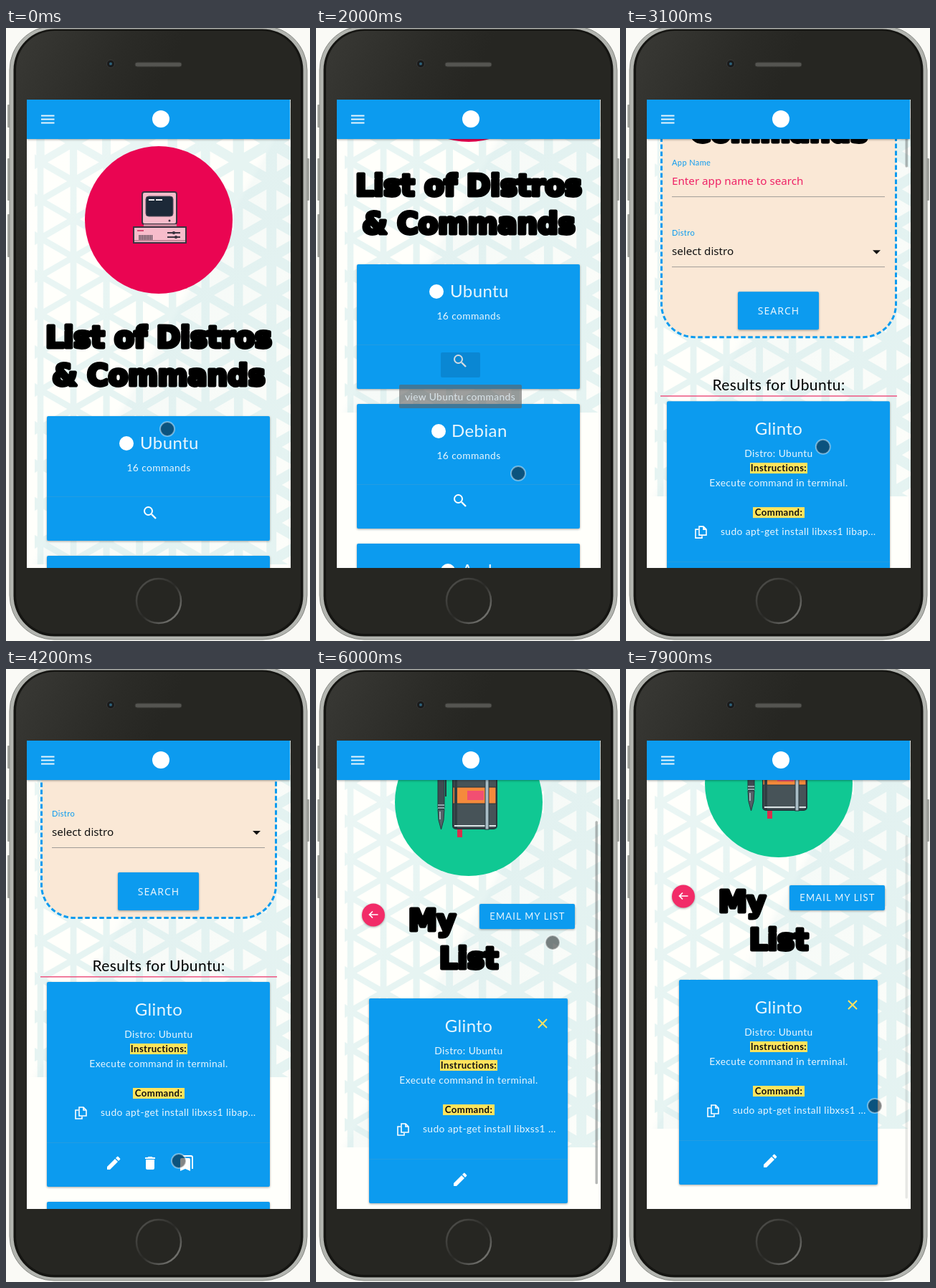
These frames come from a looping animation (424x856 px, 8 s). An HTML page:

```html
<!DOCTYPE html>
<html lang="en">
<head>
<meta charset="utf-8">
<title>Distros and commands</title>
<style>
html, body { margin: 0; width: 100%; height: 100%; overflow: hidden; background: #fafaf6; }
#stage { display: block; width: 424px; height: 856px; }
text { font-family: Lato, "Open Sans", sans-serif; font-size: 13.8px; letter-spacing: .4px; fill: #e9f6fd; white-space: pre; }
.mid { text-anchor: middle; }
.title { font-size: 24px; }
.head { font: bold 40px "DejaVu Sans", sans-serif; letter-spacing: 0; fill: #000; stroke: #000; stroke-width: 5; stroke-linejoin: round; }
.label { font-size: 11px; fill: #0c9bef; }
.field { font: 15.2px "Noto Sans", sans-serif; letter-spacing: 0; fill: #111; }
.hint { fill: #ee2266; }
.search { font: 14px "Noto Sans", sans-serif; letter-spacing: 1px; }
.caps { font-size: 13px; letter-spacing: 1.2px; }
.bold { font-size: 13.2px; font-weight: 700; fill: #111; }
.results { font-size: 21px; fill: #000; }
.lift { filter: drop-shadow(0 1px 1.5px rgba(0,0,0,.35)); }
.high { filter: drop-shadow(0 4px 4px rgba(0,0,0,.42)); }
</style>
</head>
<body>
<svg id="stage" viewBox="0 0 424 856" xmlns="http://www.w3.org/2000/svg"></svg>
<script>
const BLUE = '#0c9bef', MINT = '#e6f4f2', PAPER = '#fffffb';
const stage = document.getElementById('stage');

const rect = (x, y, w, h, fill, more = '') =>
  `<rect x="${x}" y="${y}" width="${w}" height="${h}" fill="${fill}" ${more}/>`;
const disc = (x, y, r, fill, more = '') =>
  `<circle cx="${x}" cy="${y}" r="${r}" fill="${fill}" ${more}/>`;
const line = (d, stroke, width) =>
  `<path d="${d}" fill="none" stroke="${stroke}" stroke-width="${width}"/>`;
const text = (x, y, str, cls = '') => `<text x="${x}" y="${y}" class="${cls}">${str}</text>`;
const mid = (x, y, str, cls = '') => text(x, y, str, 'mid ' + cls);
const group = (id, body) => `<g id="${id}">${body}</g>`;
const panel = (x, y, w, h, id = '') => rect(x, y, w, h, BLUE, `rx="2" class="lift" id="${id}"`);
const divider = (x, y, w) => rect(x, y, w, 1, 'rgba(150,160,160,.17)');

// Icons drawn around their own centre
const ICONS = {
  search: line('M2 2L8 8', '#fff', 2.4) + '<circle cx="-2.5" cy="-2.5" r="5.500" fill="none" stroke="#fff" stroke-width="2"/>',
  edit: '<path fill="#fff" d="M-9 5v4h4L6-2 2-6zM3-7l4 4 2-2q.8-.8 0-1.600L6.600-9q-.8-.8-1.600 0z"/>',
  trash: '<path fill="#fff" d="M-6-5H6V7q0 2-2 2h-8q-2 0-2-2zM-7-8h3.500l1-1h5l1 1H7v2H-7z"/>',
  saved: '<path fill="#fff" d="M-9 11V-5q0-2 2-2H3q2 0 2 2v16l-7-3z"/>' + line('M-5-10H6q2 0 2 2V8', '#fff', 2),
  copy: line('M-2-8h6l4 4v8h-10zM4-8v4h4M-3-4h-4v12h9v-3', '#fff', 1.6),
  close: line('M-6-6L6 6M6-6L-6 6', '#ffe261', 2)
};
const icon = (name, x, y) => `<g transform="translate(${x} ${y})">${ICONS[name]}</g>`;

// Triangle lattice with openings that shrink towards the top and the right
function backdrop(y) {
  const colW = 46, rowH = 53;
  let d = '';
  const tri = (x, cy, dir) => {
    const s = .72 - .2 * (x / 368) ** 2 - .2 * Math.max(0, 1 - cy / 120);
    const w = dir * colW * s, h = rowH / 2 * s;
    d += `M${x - w / 3} ${cy - h}v${2 * h}l${w} ${-h}z`;
  };
  for (let k = -1; k < 8; k++) {
    for (let j = -1; j < 14; j++) {
      const x = 19 + colW * k, cy = 13 + rowH * (j + (k & 1) / 2);
      tri(x + colW / 3, cy, 1);
      tri(x + colW * 2 / 3, cy + rowH / 2, -1);
    }
  }
  return `<svg x="29" y="${y}" width="368" height="654" overflow="hidden">` +
    rect(11, 0, 357, 654, MINT) + `<path d="${d}" fill="${PAPER}"/>` +
    rect(0, 0, 368, 654, 'url(#wash)') + '</svg>';
}

const sheet = bgTop => rect(29, -200, 368, 2000, PAPER) + backdrop(bgTop);

function distroCard(y, name, textX, logoX) {
  return panel(57, y, 311, 174) + divider(57, y + 112, 311) +
    disc(logoX, y + 38, 10, '#fff') + text(textX, y + 46, name, 'title') +
    mid(213, y + 77, '16 commands') + icon('search', 201, y + 135);
}

function commandCard(x, y, w, command, id) {
  const marked = (ty, str, half) =>
    rect(213 - half, ty - 12, half * 2, 15, '#ffe45c') + mid(213, ty, str, 'bold');
  return panel(x, y, w, 286, id) +
    mid(213, y + 47, 'Glinto', 'title') + mid(213, y + 78, 'Distro: Ubuntu') +
    marked(y + 98, 'Instructions:', 40) +
    mid(213, y + 118.5, 'Execute command in terminal.') +
    marked(y + 160, 'Command:', 36) +
    icon('copy', x + 47, y + 183) + text(x + 75, y + 187, command) +
    divider(x, y + 224, w);
}

function computer() {
  const ink = '#3b3340', pink = '#f7bccb', shade = '#c9899c';
  let slots = '';
  for (let i = 0; i < 9; i++) slots += `M${186 + 2.2 * i} 289v7`;
  return rect(190, 229, 48, 45, pink, `rx="3" stroke="${ink}" stroke-width="2"`) +
    rect(195, 235, 38, 28, '#1c2938', 'rx="4" stroke="#56505f"') +
    line('M199 240h8M209 240h9', '#f2f2f2', 2) + disc(228, 269, 1.5, ink) +
    rect(192, 274, 46, 4, shade) +
    rect(178, 278, 73, 22, pink, `stroke="${ink}" stroke-width="2"`) +
    line('M179 297h71', shade, 2) + line(slots, ink, 1.1) +
    line('M183 283h9', '#d64c74', 2) + line('M225 286h18M225 292h18', ink, 2) +
    line('M234 284v4M237 290v4', ink, 3);
}

function notebook() {
  const ink = '#26363c', edge = `stroke="${ink}"`;
  return rect(197, 221, 7, 14, '#d92f4c') +
    rect(191, 138, 61, 85, '#475358', `rx="4" stroke-width="2" ${edge}`) +
    rect(191, 165, 60, 23, '#f58a3c', edge) + rect(211, 170, 23, 13, '#f24f72') +
    line('M195 139v83', '#313e43', 4) + line('M193 219h58', '#dce5e6', 2) +
    rect(236, 138, 5, 86, '#a9bdc6', edge) +
    rect(170, 146, 9, 50, '#3f4b52', `rx="2" ${edge}`) +
    line('M179 150h2v28', ink, 2) + line('M170 190h9M170 194h9', '#8fa3ab', 2) +
    `<path d="M170 196h9l-1 15-3.500 13-3.500-13z" fill="#536168" ${edge}/>` +
    line('M173 199v11', '#b7c8ce', 1.5);
}

const tip = rect(174, 665, 55, 35, 'rgba(0,40,70,.17)', 'rx="2"') +
  rect(116, 710, 171, 33, 'rgba(97,97,97,.6)', 'rx="2"') +
  `<g opacity=".8">${mid(201, 732, 'view Ubuntu commands')}</g>`;

const home = sheet(95) + disc(213, 268, 103, '#ea0552') + computer() +
  mid(213, 446, 'List of Distros', 'head') + mid(213, 499, '&amp; Commands', 'head') +
  distroCard(542, 'Ubuntu', 187, 168) + distroCard(737, 'Debian', 189, 171) +
  distroCard(932, 'Arch', 203, 184) + group('tip', tip);

const find = sheet(155) +
  rect(49.5, 197.5, 327, 389, '#fae8d6', `rx="46" stroke="${BLUE}" stroke-width="3" stroke-dasharray="6.5 3.5"`) +
  mid(213, 261, 'Find', 'head') + mid(213, 314, 'Commands', 'head') +
  text(64, 347, 'App Name', 'label') + text(64, 374, 'Enter app name to search', 'field hint') +
  text(64, 445, 'Distro', 'label') + text(64, 472, 'select distro', 'field') +
  line('M64 390.5h297M64 488.5h297', '#a09c97', 1) +
  '<path d="M344 465h11l-5.5 5.5z" fill="#111"/>' +
  panel(156, 523, 113, 53) + mid(213, 555, 'SEARCH', 'search') +
  mid(213, 661, 'Results for Ubuntu:', 'results') + rect(48, 668, 330, 1.6, '#ee5f88') +
  commandCard(57, 676, 311, 'sudo apt-get install libxss1 libap…', 'pick') +
  ['edit', 'trash', 'saved'].map((name, i) => icon(name, 150 + 51 * i, 929)).join('') +
  panel(57, 983, 311, 286);

const list = sheet(14) + disc(213, 186, 103, '#10c893') + notebook() +
  disc(80, 343.5, 16, '#f22c68', 'class="lift"') +
  line('M86.5 343h-12M79 338.5l-4.500 4.500 4.500 4.500', '#fff', 1.7) +
  mid(162, 365, 'My', 'head') + mid(213, 418, 'List', 'head') +
  panel(228, 328, 133, 35) + mid(295, 350, 'EMAIL MY LIST', 'caps') +
  commandCard(74, 460, 277, 'sudo apt-get install libxss1 …', '') +
  icon('edit', 201, 713) + icon('close', 316, 495);

const button = (x, y, h) => rect(x, y, 4, h, '#a3a5a0', 'rx="1"');
const phone = button(2, 107, 32) + button(2, 182, 59) + button(2, 260, 60) + button(419, 182, 59) +
  rect(5, -3, 415, 857, '#b2b4af', 'rx="62" stroke="#858782"') +
  rect(10.5, 1.5, 404, 848, '#151512', 'rx="57"') +
  rect(14, 4, 397, 842, 'url(#body)', 'rx="54"') +
  disc(146, 50, 5.5, '#191a1b', 'stroke="#3a3a37"') + disc(146, 50, 2, '#2d6079') +
  rect(180, 48, 65, 6, '#555551', 'rx="3" stroke="#3a3a37"') +
  disc(213, 800, 31, 'none', 'stroke="url(#ring)" stroke-width="2.5"');

const nav = rect(29, 100, 367, 55, BLUE, 'class="lift"') +
  line('M49 122.5h18.5M49 127.5h18.5M49 132.5h18.5', '#e6f5fd', 1.8) + disc(216, 127, 12, '#fff');

const stop = (at, color, alpha = 1) =>
  `<stop offset="${at}" stop-color="${color}" stop-opacity="${alpha}"/>`;
const gradient = (id, ...stops) =>
  `<linearGradient id="${id}" x1="0" y1="0" x2="1" y2="1">${stops.join('')}</linearGradient>`;

stage.innerHTML = '<defs><clipPath id="screen">' + rect(29, 100, 368, 654, '#000') + '</clipPath>' +
  gradient('wash', stop(0, '#fff', .25), stop(.5, '#fff', 0), stop(.52, '#d3e7ea', .2), stop(1, '#d3e7ea', .05)) +
  gradient('body', stop(0, '#393935'), stop(.2, '#2b2b27'), stop(.3, '#262622'), stop(1, '#262622')) +
  gradient('ring', stop(0, '#555551'), stop(.5, '#2b2b28'), stop(1, '#8b8b87')) + '</defs>' + phone +
  '<g clip-path="url(#screen)">' + group('home', home) + group('find', find) + group('list', list) +
  rect(389.5, 0, 3.5, 10, 'rgba(110,115,115,.5)', 'rx="1.5" id="bar"') + nav +
  group('cursor', disc(0, 0, 10, 'rgba(10,12,14,.5)', 'stroke="rgba(255,255,255,.42)" stroke-width="2"')) + '</g>';

const clamp = v => Math.max(0, Math.min(1, v));
const smooth = p => p * p * (3 - 2 * p);
const speedUp = p => p ** 2.15;
const slowDown = p => 1 - (1 - p) ** 4.5;

// "drawn" is the scroll position at which a page was laid out; the thumb moves by "rate"
const PAGES = {
  home: { from: 0, drawn: 60, thumb: 251, rate: .384,
    drags: [{ start: 300, end: 900, by: 212, ease: speedUp }] },
  find: { from: 2300, drawn: 0, thumb: 74, rate: .113,
    drags: [{ start: 2800, end: 3300, by: 239, ease: smooth }] },
  list: { from: 5000, drawn: 141, thumb: 507, rate: .775,
    drags: [{ start: 4900, end: 5000, by: 0, ease: smooth },
      { start: 5600, end: 6200, by: 142, ease: slowDown },
      { start: 6800, end: 7600, by: 25, ease: smooth }] }
};
const HOME_TOP = PAGES.home.drawn;

// Pointer stops: time of arrival, place, and how long it rests there
const STOPS = [[0, 225, 560, 300], [700, 236, 483, 0], [900, 239, 470, 100], [1300, 202, 467, 300],
  [1900, 282, 622, 900], [3300, 270, 560, 100], [3800, 203, 671, 100], [4200, 241, 687, 200],
  [4800, 218, 706, 300], [5500, 325, 515, 100], [6000, 330, 382, 300], [6700, 345, 638, 100], [7800, 347, 610, 200]];

function pointer(t) {
  const i = STOPS.findLastIndex(s => s[0] <= t);
  const [start, x, y, rest] = STOPS[i];
  const [end, x2, y2] = STOPS[i + 1] || [8000, x, y];
  const p = clamp((t - start - rest) / (end - start - rest || 1));
  return `${x + (x2 - x) * p} ${y + (y2 - y) * p}`;
}

const scrolled = (page, t) => page.drags.reduce(
  (sum, d) => sum + d.by * d.ease(clamp((t - d.start) / (d.end - d.start))), page === PAGES.home ? HOME_TOP : 0);

// The thumb shows during a drag and fades soon after
const thumbAlpha = (page, t) => Math.max(...page.drags.map(
  d => t <= d.start ? 0 : clamp(1 - (t - d.end - 100) / 300)));

const el = {};
for (const id of ['home', 'find', 'list', 'tip', 'bar', 'pick', 'cursor']) el[id] = document.getElementById(id);
const show = (node, on) => node.setAttribute('display', on ? 'inline' : 'none');

function draw(now) {
  const t = Math.floor(now % 8000 / 100) * 100;
  const current = Object.keys(PAGES).findLast(name => PAGES[name].from <= t);
  for (const name in PAGES) {
    const page = PAGES[name];
    el[name].setAttribute('transform', `translate(0 ${page.drawn - scrolled(page, t)})`);
    show(el[name], name === current || (name === 'home' && t < 2700));
  }
  el.find.setAttribute('opacity', clamp((t - 2200) / 500));
  show(el.tip, t >= 1500);
  el.pick.setAttribute('class', t >= 4400 ? 'high' : 'lift');

  const page = PAGES[current];
  el.bar.setAttribute('y', 103 + scrolled(page, t) * page.rate);
  el.bar.setAttribute('height', page.thumb);
  el.bar.setAttribute('opacity', thumbAlpha(page, t));
  el.cursor.setAttribute('transform', `translate(${pointer(t)})`);
}

function tick() {
  draw(performance.now());
  requestAnimationFrame(tick);
}
tick();
</script>
</body>
</html>
```
